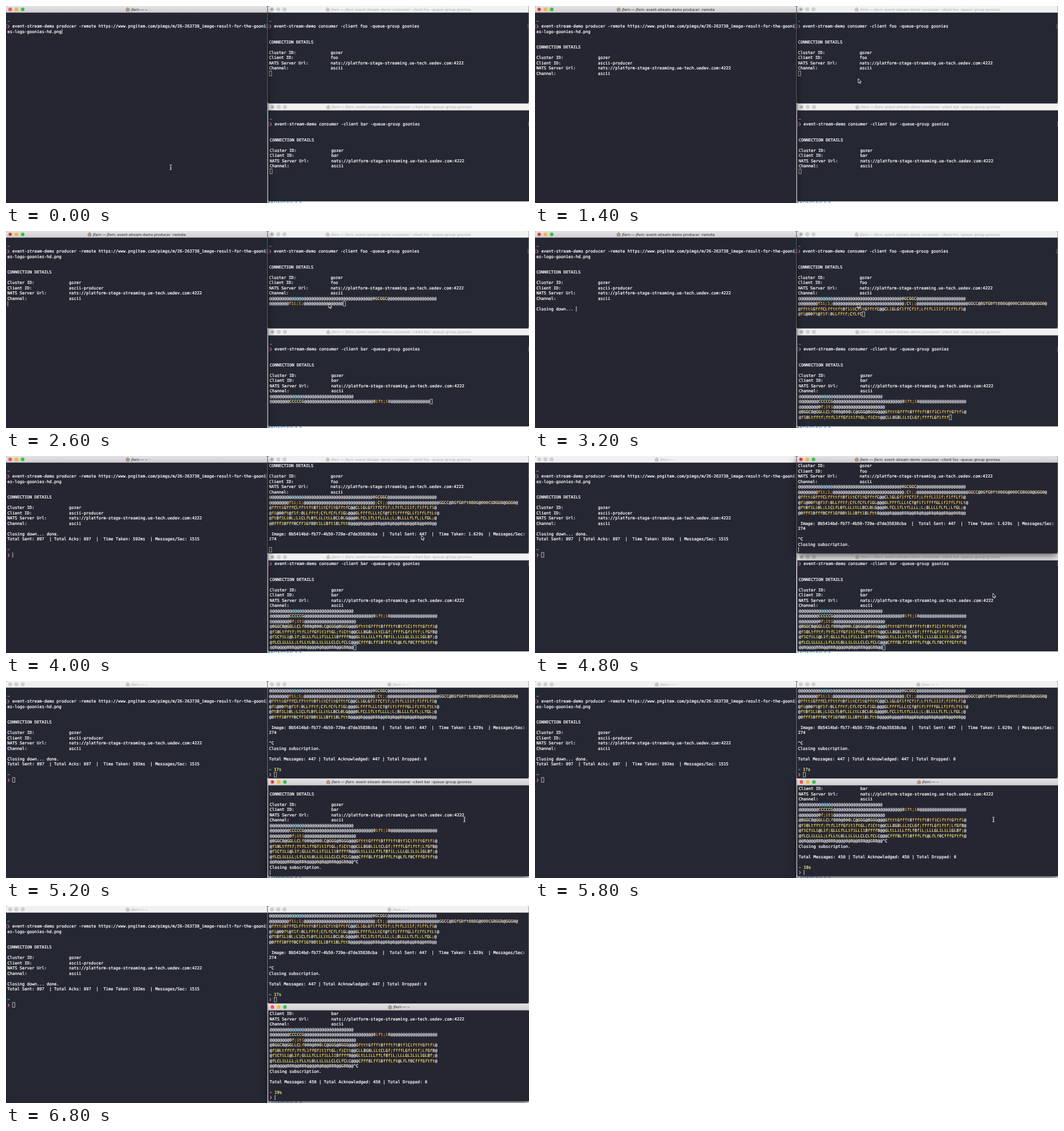
Write an HTML page that moves like this. It is 851x320 px and loops after 7 s.

```html
<!DOCTYPE html>
<html lang="en">
<head>
<meta charset="utf-8">
<title>Event stream demo</title>
<style>
html, body { margin: 0; width: 100%; height: 100%; overflow: hidden; background: #e4e6ea; }
svg { display: block; width: 851px; height: 320px; }
text { white-space: pre; text-rendering: geometricPrecision; }
.mono { font: 6.66px "DejaVu Sans Mono", monospace; color: #fff; }
.mono, .mono tspan { fill: currentColor; stroke: currentColor; stroke-width: .22px; }
.title { font: 500 6.1px Inter, sans-serif; text-anchor: middle; }
</style>
</head>
<body>
<svg id="stage" viewBox="0 0 851 320" xmlns="http://www.w3.org/2000/svg">
  <defs>
    <linearGradient id="bar" x2="0" y2="1">
      <stop stop-color="#e4e2e4"/><stop offset="1" stop-color="#d0ced0"/>
    </linearGradient>
    <filter id="shade" x="-20%" y="-30%" width="140%" height="160%">
      <feDropShadow dx="0" dy="5" stdDeviation="7" flood-color="#000" flood-opacity=".6"/>
    </filter>
  </defs>
  <rect width="851" height="320" fill="#e4e6ea"/>
  <rect x="425" width="2" height="158" fill="#8a8c92"/>
  <rect x="425" y="317" width="426" height="3" fill="#f4f6f9"/>
  <text x="426" y="324.4" font-family="Inter, sans-serif" font-size="9.4" fill="#3f86c8">MONDAY ^ ^</text>
  <g id="screen"></g>
  <g id="mouse"></g>
</svg>
<script>
const LOOP = 7000, STEP = 200;
const CW = 4.01, LH = 8.51, ROWS = 17;
const USER = 'jfern';
const CYAN = '#62d6ea', PINK = '#ff6fcb', YELLOW = '#f1f28c';
const screen = document.getElementById('screen');
const mouse = document.getElementById('mouse');

const at = n => '@'.repeat(n);
const artFoo = [
  at(42) + '0GCGGC' + at(20),
  at(8) + 'f1i;1;' + at(29) + ';Ct;;' + at(21) + 'GGCC@8GfG0ft080G@000CG8GG8@GGG0@',
  '@ffttiGfffCLffttft8f1itCf1tGfftfC@@CL1GLGf1ffCf1f;LftfL111f;f1ffLf1@',
  '@fi@00ft@f1f:0LLfftf;CfLfCfLf1GL@@@GLffffLLLtCf@fififfffGLif1ffLftLt@',
  '@ft8f1Li0L;L1CLfL0fLiLitLL8CL0LG@@@0LfCL1fLtfLLLL;L;8LLLLfLfL;LfGL;@',
  '@0fff10fff0Cff1Gf08t1Li8ft18Lftt8@@@@8@@@@888@@88@8@@88@8@@88@@008@@'
];
const artBar = [
  at(34),
  at(8) + 'CCCCCG' + at(28) + '0ift;i0' + at(19),
  at(8) + '0f;iti' + at(21),
  '@8GGC8@GGLLCLf080@800LC@GGG@8GGG@@@GftttGffft8ffftft8tf1CiftftGftfi@',
  '@f10Ltfftf;ftfL1ffGfit1ftGL;fiCtt@@CLL8G8LiLtCLGf;ffffLGfiftf;LfGf8@',
  '@f1CfiLi@L1f;GLLLfLLif1LL118ffff8@@GLtLLiLLffLf8fiL;LLLGL1LiL1GL8f;@',
  '@fLCLiLLLL;LfLLtL0LLiLiLLCLCLfCLC@@@Cfff8Lff18fffLft@LfLf0CfffGftft@',
  '@@8@@@@888@@888@@@@0@8@@888@@G88@@'
];

// Letters run from orange to yellow down the picture; denser ones are paler
function tone(ch, row, col) {
  if (ch === '@') return row === 0 && col > 8 && col < 14 ? '#b4e4f2' : '#e2e3e6';
  if (row === 1 && col > 68) return '#f0d6b2';
  if ('80'.includes(ch)) return '#f4efe0';
  if ('GC'.includes(ch)) return '#f3e4ae';
  const light = ch === 'L' ? 65 : ch === 'f' ? 61 : ch === 't' ? 58 : 54;
  return `hsl(${32 + row * 3.6} 82% ${light}%)`;
}

// A line is a list of runs: [column, text, colour]
const plain = s => s ? [[0, s]] : [];
const home = time => [[0, '~', CYAN], ...(time ? [[2, time, YELLOW]] : [])];
const prompt = s => [[0, '❯', PINK], [2, s || '']];

function paint(s, row) {
  const runs = [];
  [...s].forEach((ch, col) => {
    const c = tone(ch, row, col), last = runs[runs.length - 1];
    if (last && last[2] === c) last[1] += ch;
    else runs.push([col, ch, c]);
  });
  return runs;
}

function details(client) {
  const pair = (k, v) => [[0, k], [25, v]];
  return [plain('CONNECTION DETAILS'), [],
    pair('Cluster ID:', 'gozer'), pair('Client ID:', client),
    pair('NATS Server Url:', 'nats://platform-stage-streaming.ue-tech.uedev.com:4222'),
    pair('Channel:', 'ascii')];
}

function mix(keys, t) {
  let i = 0;
  while (i < keys.length - 2 && t >= keys[i + 1][0]) i++;
  const [a, b] = [keys[i], keys[i + 1]];
  const p = Math.min(1, Math.max(0, (t - a[0]) / (b[0] - a[0])));
  return a.slice(1).map((v, k) => v + (b[k + 1] - v) * p);
}

function stream(art, count) {
  const out = [];
  for (let row = 0; row < art.length && count > 0; row++) {
    const s = art[row].slice(0, count);
    out.push(paint(s, row));
    count -= s.length;
  }
  return out;
}

const lineEnd = l => l.length ? l[l.length - 1][0] + l[l.length - 1][1].length : 0;

function producer(t) {
  const lines = [[], home(),
    prompt('event-stream-demo producer -remote https://www.pngitem.com/pimgs/m/26-263738_image-result-for-the-gooni'),
    plain('es-logo-goonies-hd.png')];
  if (t < 200) return lines;
  lines.push([]);
  if (t < 400) return lines;
  lines.push([], ...details('ascii-producer'), []);
  if (t < 2800) return lines;
  lines.push(plain('Closing down... ' + (t < 3400 ? '' : 'done.')));
  if (t >= 3400) lines.push(
    plain('Total Sent: 897  | Total Acks: 897  |  Time Taken: 592ms  | Messages/Sec: 1515'),
    [], home(), prompt());
  return lines;
}

function consumer(t, o) {
  const lines = [[], home(),
    prompt(`event-stream-demo consumer -client ${o.client} -queue-group goonies`),
    [], [], ...details(o.client)];
  const art = stream(o.art, Math.floor(mix(o.flow, t)[0]));
  lines.push(...art);
  if (!art.length) lines.push([]);
  if (o.summary && t >= 4000) lines.push([],
    plain(' Image: 8b5414bd-fb77-4b50-729e-d7de35838cba  |  Total Sent: 447  |  Time Taken: 1.629s  | Messages/Sec:'),
    plain('274'), [], []);
  if (t >= o.stop) {
    const last = lines[lines.length - 1];
    last.push([lineEnd(last), '^C']);
    lines.push(plain('Closing subscription.'), []);
  }
  if (t >= o.end) lines.push(
    plain(`Total Messages: ${o.total} | Total Acknowledged: ${o.total} | Total Dropped: 0`),
    [], home(o.took), prompt());
  return lines;
}

const foo = { client: 'foo', art: artFoo, summary: true, stop: 4800, end: 5000, total: 447, took: '17s',
  flow: [[2240, 0], [3200, 263], [3400, 271], [3900, 447]] };
const bar = { client: 'bar', art: artBar, stop: 5200, end: 5400, total: 450, took: '19s',
  flow: [[2240, 0], [3200, 266], [3400, 272], [3900, 447]] };

const focusAt = t => t < 4200 ? 0 : t < 5000 ? 1 : 2;
const blinkOff = t => (t >= 1400 && t < 2000) || (t >= 6000 && t < 6600);

function lights(x, y, focus, busy) {
  const colors = focus ? ['#f4574f', '#f5b731', '#35c144'] : ['#d2d2d2', '#d2d2d2', '#d2d2d2'];
  const edge = focus ? 'none' : '#b8b8b8';
  return colors.map((c, i) =>
    `<circle cx="${x + 6.8 + i * 10.2}" cy="${y + 5.4}" r="2.9" fill="${c}" stroke="${edge}" stroke-width=".5"/>`).join('') +
    (busy ? `<circle cx="${x + 6.8}" cy="${y + 5.4}" r="1.1" fill="${focus ? '#7c1512' : '#777'}"/>` : '');
}

function windowOf(w, lines, title, focus, busy, t) {
  const { x, y, width, height, left, top } = w;
  const scroll = Math.max(0, lines.length - (w.rows || ROWS));
  const mid = row => top + (row - scroll) * LH;
  let s = `<rect x="${x}" y="${y}" width="${width}" height="${height}" rx="2.5" fill="#252833"
      ${focus ? 'filter="url(#shade)"' : 'stroke="#000" stroke-opacity=".25" stroke-width=".8"'}/>
    <path d="M${x} ${y + 10.8}v-8.3q0-2.5 2.5-2.5h${width - 5}q2.5 0 2.5 2.5v8.3z" fill="${focus ? 'url(#bar)' : '#f1f1f1'}"/>`;
  s += lights(x, y, focus, busy);
  s += `<g class="head" data-mid="${x + width / 2}" opacity="${focus ? 1 : .5}">
    <path class="icon" d="M0 3.6L3.3 .5 6.6 3.6H5.6V6.6H1V3.6z" fill="#b09a86" stroke="#756557" stroke-width=".5" data-y="${y + 1.8}"/>
    <text class="title" y="${y + 7.6}" fill="${focus ? '#3a3a3a' : '#7d7d7d'}">${title}</text></g>`;
  lines.forEach((line, row) => {
    if (row < scroll || !line.length) return;
    const base = (mid(row) + 2.2).toFixed(2);
    s += `<text class="mono" y="${base}">` + line.map(([col, str, c]) =>
      `<tspan x="${(left + col * CW).toFixed(2)}"${c ? ` style="color:${c}"` : ''}>${str}</tspan>`).join('') + '</text>';
    if (row === 2) s += `<path d="M${left - .2} ${mid(row) - 3.2}h-1v6.4h1M${x + width - 2.2} ${mid(row) - 3.2}h1v6.4h-1" fill="none" stroke="#8a8c94" stroke-width=".6"/>`;
  });
  const last = lines.length - 1, cx = left + lineEnd(lines[last]) * CW, cy = mid(last);
  if (!focus) s += `<rect x="${cx + .5}" y="${cy - 3.9}" width="3.6" height="7.8" fill="none" stroke="#c6c6c6" stroke-width=".8"/>`;
  else if (!blinkOff(t)) s += `<rect x="${cx + .3}" y="${cy - 4.1}" width="1" height="8.2" fill="#c6c6c6"/>`;
  return s;
}

const wins = [
  { x: 0, y: 0, width: 425, height: 322, left: 2.2, top: 16, rows: 36 },
  { x: 426, y: 0, width: 424.5, height: 158, left: 428, top: 16 },
  { x: 426.7, y: 158.6, width: 425, height: 158.7, left: 429, top: 175 }
];
const path = [[0, 268, 262], [200, 268, 262], [1200, 528, 122], [3200, 527, 122],
  [3400, 527, 122], [4000, 678, 133], [4200, 678, 133], [4800, 747, 227], [5200, 746, 225], [7000, 746, 225]];

function drawMouse(t, focus) {
  if (t >= 6000) { mouse.innerHTML = ''; return; }
  const [x, y] = mix(path, t);
  const over = x < 425 ? 0 : y < 159 ? 1 : 2;
  const beam = 'M-1.7-4Q0-4 0-2.8 0-4 1.7-4M0-3V3M-1.7 4Q0 4 0 2.8 0 4 1.7 4M-1 .9H1';
  mouse.setAttribute('transform', `translate(${x} ${y})`);
  mouse.innerHTML = over === focus
    ? `<path d="${beam}" fill="none" stroke="#e6e6e6" stroke-width=".9"/>`
    : '<path d="M-2-4V3L-.4 1.6 .7 4.1 1.8 3.6 .8 1.2H3z" fill="#111" stroke="#fff" stroke-width=".8"/>';
}

function draw(t) {
  const focus = focusAt(t);
  const name = cmd => cmd ? `${USER} — ${USER}: event-stream-demo ${cmd}` : `${USER} — ~`;
  const sending = t >= 200 && t < 3400;
  const group = o => t < o.end && `consumer -client ${o.client} -queue-group goonies`;
  const data = [
    [producer(t), name(sending && 'producer -remote'), sending],
    [consumer(t, foo), name(group(foo)), t < foo.end],
    [consumer(t, bar), name(group(bar)), t < bar.end]
  ];
  // The focused window lies on top
  const order = [0, 1, 2].sort((a, b) => (a === focus) - (b === focus));
  screen.innerHTML = order.map(i => {
    const [lines, title, busy] = data[i];
    return windowOf(wins[i], lines, title, i === focus, busy, t);
  }).join('');
  screen.querySelectorAll('.head').forEach(head => {
    const text = head.querySelector('.title'), icon = head.querySelector('.icon');
    const mid = +head.dataset.mid + 4.5;
    text.setAttribute('x', mid);
    icon.setAttribute('transform', `translate(${mid - text.getComputedTextLength() / 2 - 8.8} ${icon.dataset.y})`);
  });
  drawMouse(t, focus);
}

let shown = -1;
function tick() {
  const t = Math.floor(performance.now() % LOOP / STEP) * STEP;
  if (t !== shown) draw(shown = t);
  requestAnimationFrame(tick);
}
tick();
</script>
</body>
</html>
```
